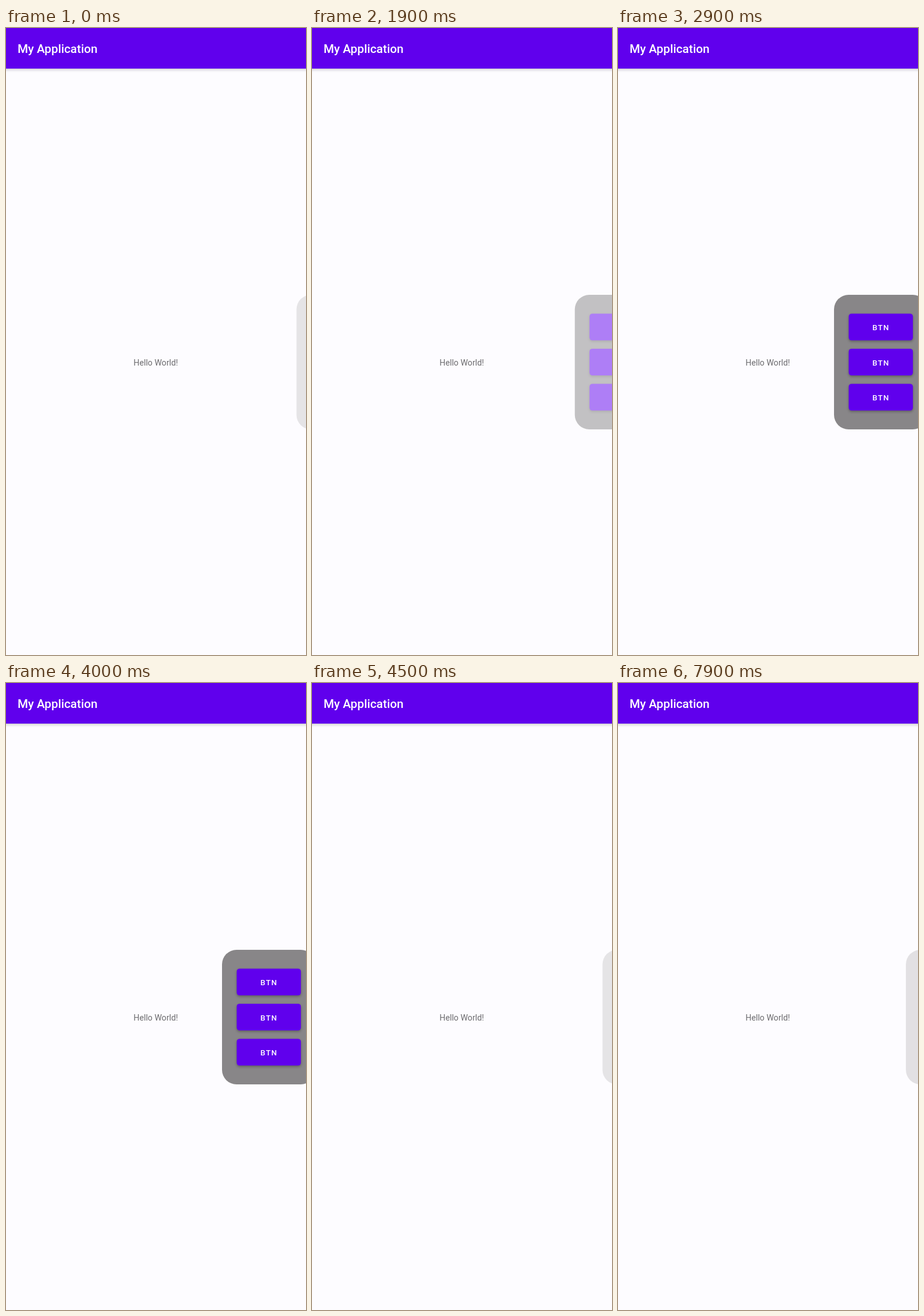
An HTML page with a canvas for the animation above (8000 ms loop, 518 by 1081 pixels).

```html
<!DOCTYPE html>
<html lang="en">
<head>
<meta charset="utf-8">
<title>Sliding panel</title>
<style>
  html, body { margin: 0; width: 100%; height: 100%; overflow: hidden; background: #fdfcff; }
  canvas { display: block; }
</style>
</head>
<body>
<canvas id="stage" width="518" height="1081"></canvas>
<script>
const W = 518, H = 1081, LOOP = 8000, STEP = 100;
const CLOSED = 501.6, OPEN = 373, SLIDE = 400;
const PURPLE = '#6000ed';
const FONT = 'Roboto, "Noto Sans", sans-serif';

const ctx = document.getElementById('stage').getContext('2d');
const layer = document.createElement('canvas');
layer.width = W;
layer.height = H;
const panel = layer.getContext('2d');

// Accelerate, then decelerate, from 0 to 1
function ease(t, start) {
  const p = Math.min(1, Math.max(0, (t - start) / SLIDE));
  return (1 - Math.cos(Math.PI * p)) / 2;
}

// Slow finger drag before the panel is released
function drag(t, start) {
  return Math.max(0, t - start) * 0.015;
}

function panelX(t) {
  const span = CLOSED - OPEN;
  if (t < 4000) return Math.min(CLOSED - drag(Math.min(t, 1800), 1600), CLOSED - span * ease(t, 1733));
  if (t < 7600) return OPEN + span * ease(t, 4084);
  return CLOSED - drag(t, 7600);
}

function roundRect(c, x, y, w, h, r, fill) {
  c.beginPath();
  c.roundRect(x, y, w, h, r);
  c.fillStyle = fill;
  c.fill();
}

function text(c, str, x, y, size, weight, fill, spacing = 0) {
  c.font = `${weight} ${size}px ${FONT}`;
  c.letterSpacing = spacing + 'px';
  c.fillStyle = fill;
  c.fillText(str, x, y);
}

function shadow(c, blur, dy, alpha) {
  c.shadowColor = `rgba(0,0,0,${alpha})`;
  c.shadowBlur = blur;
  c.shadowOffsetY = dy;
}

function drawPanel(x) {
  panel.clearRect(0, 0, W, H);
  roundRect(panel, x, 460, 161, 232, 25, '#888688');
  for (let i = 0; i < 3; i++) {
    const y = 492.4 + i * 60.5;
    panel.save();
    shadow(panel, 4, 2, 0.3);
    roundRect(panel, x + 25.4, y, 110.8, 46.2, 5, PURPLE);
    panel.restore();
    text(panel, 'BTN', x + 66.2, y + 28.7, 13.4, 500, '#fff', 1.2);
  }
  // The panel fades as one piece, from 20% closed to 100% open
  ctx.globalAlpha = 1 - 0.8 * (x - OPEN) / (CLOSED - OPEN);
  ctx.drawImage(layer, 0, 0);
  ctx.globalAlpha = 1;
}

function draw(t) {
  ctx.fillStyle = '#fdfcff';
  ctx.fillRect(0, 0, W, H);

  ctx.save();
  shadow(ctx, 5, 2, 0.2);
  ctx.fillStyle = PURPLE;
  ctx.fillRect(-10, -10, W + 20, 80);
  ctx.restore();

  text(ctx, 'My Application', 20, 43, 20.7, 500, '#fff');
  text(ctx, 'Hello World!', 220.3, 582, 14.2, 400, '#6c6b6e');
  drawPanel(panelX(t));
}

function frame() {
  const t = performance.now() % LOOP;
  draw(Math.floor(t / STEP) * STEP);
  requestAnimationFrame(frame);
}
frame();
</script>
</body>
</html>
```
